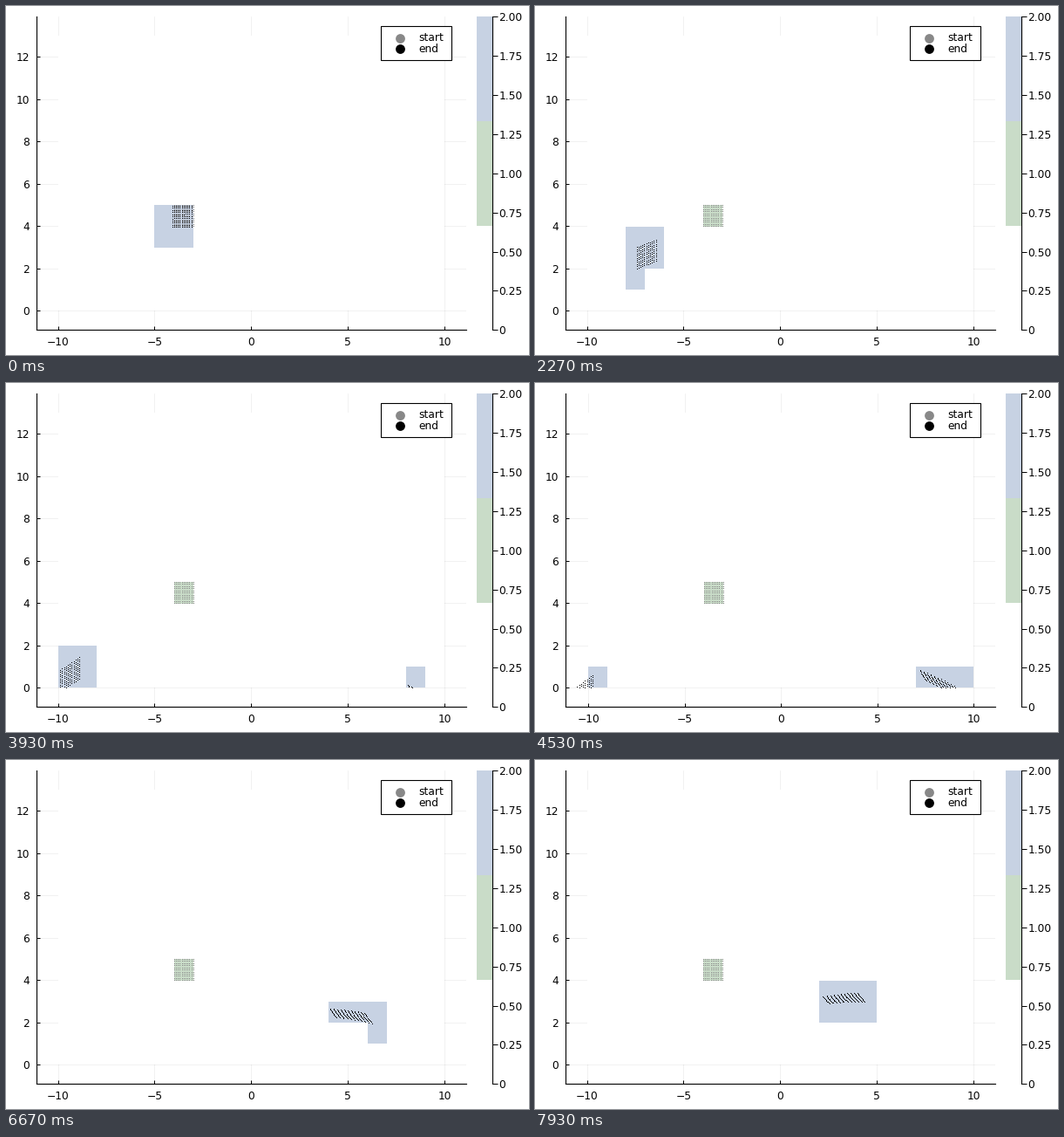
Write a matplotlib script that moves like this. It is 600x400 px and loops after 8000 ms.

```python
import matplotlib.pyplot as plt
import numpy as np
from matplotlib.animation import FuncAnimation
from matplotlib.colors import ListedColormap
from matplotlib.patches import Rectangle
from matplotlib.transforms import ScaledTranslation

W, H, DPI = 600, 400, 100
STEPS, TICKS, LOOP_MS = 120, 240, 8000
GRAVITY, BOUNCE, DT = 9.81, 0.85, 0.01
BLUE, GREEN, GRAY = "#c7d2e3", "#c9dcc8", "#888888"
PX = 72 / DPI  # one pixel in points

plt.rcParams.update({"font.family": "DejaVu Sans", "font.size": 8.8,
                     "axes.linewidth": 1.1 * PX})


def pixel_axes(left, top, right, bottom):
    return fig.add_axes([left / W, 1 - bottom / H,
                         (right - left) / W, (bottom - top) / H])


def lowered(axes, pixels):
    """Data coordinates moved down by a few pixels."""
    return axes.transData + ScaledTranslation(0, -pixels / DPI,
                                              fig.dpi_scale_trans)


def fall(v, p, t):
    """Velocity and height after t seconds, with one bounce at the ground."""
    impact = np.sqrt(v ** 2 + 2 * GRAVITY * p)
    t_hit = (v + impact) / GRAVITY
    hit = t > t_hit
    v = np.where(hit, BOUNCE * impact, v)
    p = np.where(hit, 0, p)
    t = np.where(hit, t - t_hit, t)
    return v - GRAVITY * t, p + v * t - GRAVITY * t ** 2 / 2


def cells(v, p):
    """Grid of 13 x 20 unit cells: 1 is the start cell, 2 a reached cell."""
    grid = np.zeros((13, 20))
    grid[4, 6] = 1
    col, row = np.floor(v).astype(int) + 10, np.floor(p).astype(int)
    ok = (col >= 0) & (col < 20) & (row >= 0) & (row < 13)
    grid[row[ok], col[ok]] = 2
    return grid


fig = plt.figure(figsize=(W / DPI, H / DPI), dpi=DPI, facecolor="white")

# Phase plot
ax = pixel_axes(34.52, 11.8, 528.3, 371.45)
ax.set_ylim(-0.92, 13.92)
ax.set_xticks(range(-10, 11, 5))
ax.set_yticks(range(0, 13, 2))
ax.spines[["top", "right"]].set_visible(False)
ax.tick_params(direction="in", length=4 * PX, width=PX, pad=7.2 * PX)
ax.set_axisbelow(True)
ax.grid(color="black", alpha=0.08, linewidth=0.5)

v0, p0 = (a.ravel() for a in np.meshgrid(np.linspace(-4, -3, 11),
                                         np.linspace(4, 5, 11)))
mesh = ax.pcolormesh(np.arange(-10, 11), np.arange(14), cells(v0, p0),
                     cmap=ListedColormap(["white", GREEN, BLUE]),
                     vmin=0, vmax=2, zorder=1, transform=lowered(ax, 0.33))
# The pixel marker is painted one row too high
dot_place = lowered(ax, 1)
ax.plot(v0, p0, ",", color=GRAY, zorder=3, transform=dot_place)
dots, = ax.plot([], [], ",", color="black", zorder=4, transform=dot_place)

# Colour bar
bar = pixel_axes(540, 11.8, 558.4, 371.45)
bar.set(xlim=(0, 1), ylim=(0, 2), xticks=[])
bar.axhspan(2 / 3, 4 / 3, color=GREEN, linewidth=0)
bar.axhspan(4 / 3, 2, color=BLUE, linewidth=0)
bar.spines[["top", "left", "bottom"]].set_visible(False)
bar.yaxis.tick_right()
levels = np.arange(0, 2.1, 0.25)
bar.set_yticks(levels, ["0"] + [f"{y:.2f}" for y in levels[1:]])
bar.tick_params(length=5.5 * PX, width=PX, pad=1.5 * PX)

# Legend
key = pixel_axes(0, 0, W, H)
key.set(xlim=(0, W), ylim=(H, 0))
key.axis("off")
key.add_patch(Rectangle((430, 23), 81, 39, facecolor="white",
                        edgecolor="black", linewidth=1.1 * PX))
for y, label, color in [(36.5, "start", GRAY), (49.4, "end", "black")]:
    key.plot(452, y, "o", color=color, markersize=10.8 * PX, markeredgewidth=0)
    key.text(473, y + 4, label, va="baseline")


def draw(tick):
    # Two ticks per step; each step is centred on its nominal time
    step = (tick + 1) // 2 % STEPS
    v, p = fall(v0, p0, (step + 1) * DT)
    mesh.set_array(cells(v, p))
    dots.set_data(v, p)
    low = min(-10.5, v.min())
    pad = 0.03 * (10.5 - low)
    ax.set_xlim(low - pad, 10.5 + pad)
    return mesh, dots


anim = FuncAnimation(fig, draw, frames=TICKS, interval=LOOP_MS / TICKS,
                     repeat=True, repeat_delay=0)
plt.show()
```
